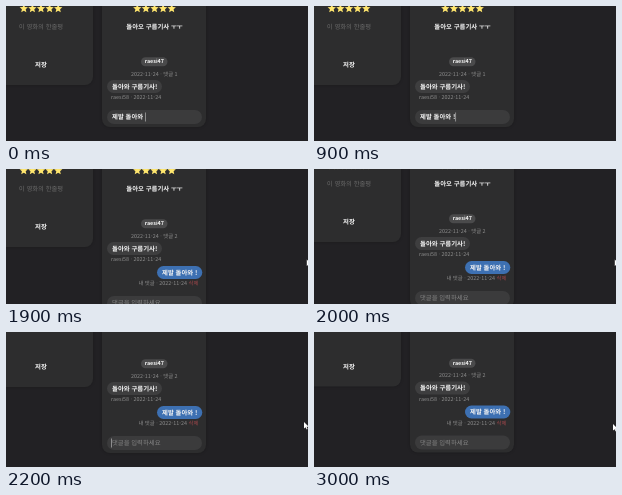
Recreate the animation shown at these times as an HTML page with a canvas. Size 302 by 135 pixels, loop 3.1 s.

```html
<!DOCTYPE html>
<html lang="ko">
<head>
<meta charset="utf-8">
<style>
html, body { margin: 0; width: 100%; height: 100%; overflow: hidden; background: #222124; }
canvas { display: block; }
</style>
</head>
<body>
<canvas id="stage" width="302" height="135"></canvas>
<script>
const ctx = document.getElementById('stage').getContext('2d');
const LOOP = 3100;
const WHITE = '#f4f4f4', GREY = '#8c8c8c', DIM = '#6a6a6a';
const SCROLL = [1, 6, 23, 24, 24.5]; // one step per 100 ms from 1900 ms

function box(x, y, w, h, r, color) {
  ctx.fillStyle = color;
  ctx.beginPath();
  ctx.roundRect(x, y, w, h, r);
  ctx.fill();
}

// y is the vertical middle of the line; returns the width
function text(str, x, y, size, color, weight = 400, align = 'left') {
  ctx.font = `${weight} ${size}px "Noto Sans CJK KR", "Noto Sans CJK", "Noto Sans", sans-serif`;
  ctx.textAlign = align;
  ctx.fillStyle = color;
  ctx.fillText(str, x, y + size * 0.37);
  return ctx.measureText(str).width;
}

function stars(cx, cy) {
  ctx.fillStyle = '#ffe66e';
  for (let n = -2; n <= 2; n++) {
    ctx.beginPath();
    for (let i = 0; i < 10; i++) {
      const r = i % 2 ? 2 : 4.4, a = i * Math.PI / 5 - Math.PI / 2;
      ctx.lineTo(cx + n * 8.6 + r * Math.cos(a), cy + r * Math.sin(a));
    }
    ctx.fill();
  }
}

function card(x, w, bottom) {
  ctx.shadowColor = 'rgba(0,0,0,.25)';
  ctx.shadowBlur = 3;
  box(x, -40, w, bottom + 40, 8, '#2d2d2e');
  ctx.shadowBlur = 0;
}

function caret(x, y) {
  ctx.fillStyle = '#b4b4b4';
  ctx.fillRect(x, y - 4.5, 0.7, 9);
}

function pointer(x, y) {
  ctx.beginPath();
  for (const [dx, dy] of [[0, 0], [0, 6.5], [1.6, 5.2], [2.7, 7.5], [3.6, 7], [2.6, 4.8], [4.6, 4.6]])
    ctx.lineTo(x + dx, y + dy);
  ctx.closePath();
  ctx.fillStyle = '#fff';
  ctx.fill();
}

function inputField(t, posted) {
  const y = posted ? 135 : 111;
  box(101, y - 7, 95, 14, 7, '#3b3b3c');
  if (posted) {
    text('댓글을 입력하세요', 106, y, 6.35, '#858585');
    if (t >= 2100 && t < 2500) caret(105.3, y);
    return;
  }
  const typed = t < 200 ? '' : t < 600 ? 'ㅇ' : t < 900 ? '' : '!';
  const width = text('제발 돌아와 ' + typed, 106, y, 6.4, WHITE, 700);
  caret(106 + width, y);
}

function draw(t) {
  const posted = t >= 1400;
  const step = Math.min(Math.floor((t - 1900) / 100), SCROLL.length - 1);
  ctx.fillStyle = '#222124';
  ctx.fillRect(0, 0, 302, 135);

  ctx.save();
  ctx.translate(0, step < 0 ? 0 : -SCROLL[step]);

  card(-20, 107, 79);
  stars(35, 2.7);
  text('이 영화의 한줄평', 35, 20.5, 6.35, DIM, 400, 'center');
  text('저장', 35, 59, 6.4, WHITE, 700, 'center');

  card(96, 104, posted ? 145 : 121);
  stars(148.5, 2.7);
  text('돌아오 구름기사 ㅜㅜ', 148.5, 20.5, 6.4, WHITE, 700, 'center');
  box(135, 51.2, 26.5, 9, 4.5, '#4a4a4b');
  text('raesi47', 148.3, 55.5, 5.4, WHITE, 700, 'center');
  text('2022-11-24 · 댓글 ' + (posted ? 2 : 1), 148.3, 68, 5.4, GREY, 400, 'center');

  box(101, 74, 55, 13, 6.5, '#3e3e3f');
  text('돌아와 구름기사!', 106, 80.4, 6.4, WHITE, 700);
  text('raesi58 · 2022-11-24', 105, 91.5, 5.4, GREY);

  if (posted) {
    box(151, 98, 45.3, 13, 6.5, '#3d70b2');
    text('제발 돌아와 !', 156, 104.5, 6.4, WHITE, 700);
    text('내 댓글 · 2022-11-24', 181, 115.5, 5.4, GREY, 400, 'right');
    text('삭제', 182.5, 115.5, 5.4, '#a2474b');
  }
  inputField(t, posted);
  ctx.restore();

  if (t >= 3000) pointer(299, 92);
  else if (t >= 2200) pointer(298, 90);
  else if (t >= 1900) pointer(300.8, 90.5);
}

ctx.textRendering = 'geometricPrecision';
const start = performance.now();
function frame() {
  draw((performance.now() - start) % LOOP);
  requestAnimationFrame(frame);
}
frame();
</script>
</body>
</html>
```
